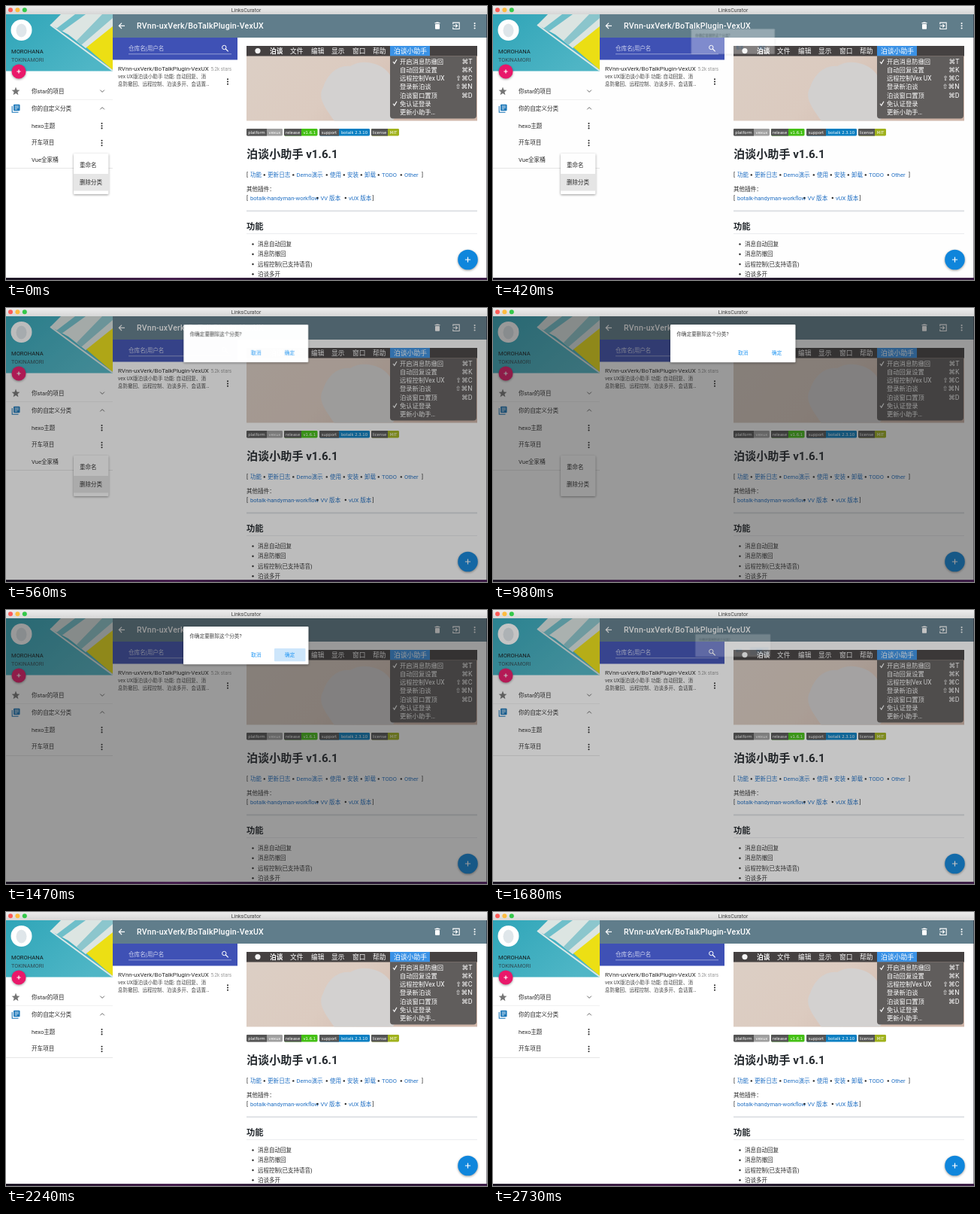
Write an HTML page that moves like this. It is 640 px wide and 364 px high and loops after 2800 ms.

```html
<!DOCTYPE html>
<html lang="zh-CN">
<head>
<meta charset="utf-8">
<title>LinksCurator</title>
<style>
html, body { margin: 0; width: 100%; height: 100%; overflow: hidden; background: #1c1724; }
svg { display: block; width: 640px; height: 364px; font-family: Roboto, "Noto Sans CJK SC", "Noto Sans CJK", sans-serif; }
text { white-space: pre; }
.badge { font-family: "DejaVu Sans", sans-serif; }
.keys { font-family: Roboto, "DejaVu Sans", sans-serif; }
.lift { filter: drop-shadow(0 1px 1.5px rgba(0,0,0,.4)); }
#dialog { transform-origin: 319px 47px; }
</style>
</head>
<body>
<svg id="stage" viewBox="0 0 640 364"></svg>
<script>
const LOOP = 2800;
const INK = '#2b2b2b', LINK = '#1f6fc4', BLUE = '#2196f3';
const REPO = 'RVnn-uxVerk/BoTalkPlugin-VexUX';

const rect = (x, y, w, h, fill, extra = '') =>
  `<rect x="${x}" y="${y}" width="${w}" height="${h}" fill="${fill}" ${extra}/>`;
const dot = (x, y, r, fill, extra = '') =>
  `<circle cx="${x}" cy="${y}" r="${r}" fill="${fill}" ${extra}/>`;
const poly = (points, fill) => `<polygon points="${points}" fill="${fill}"/>`;
const text = (x, y, size, str, fill = INK, extra = '') =>
  `<text x="${x}" y="${y}" font-size="${size}" fill="${fill}" ${extra}>${str}</text>`;
const line = (d, color, w = 1.1) =>
  `<path d="${d}" fill="none" stroke="${color}" stroke-width="${w}"/>`;
const group = (id, body) => `<g id="${id}">${body}</g>`;
const more = (x, y, color = INK) =>
  [-3.2, 0, 3.2].map(d => dot(x, y + d, 1.05, color)).join('');
const plus = (x, y, r) => line(`M${x - r} ${y}h${2 * r}M${x} ${y - r}v${2 * r}`, '#fff', 1.2);
const MEDIUM = 'font-weight="500"', BOLD = 'font-weight="700"';
const END = 'text-anchor="end"', MID = 'text-anchor="middle"';

const defs = `<defs>
  <linearGradient id="bar" x2="0" y2="1"><stop stop-color="#ededed"/><stop offset="1" stop-color="#d6d6d6"/></linearGradient>
  <linearGradient id="teal" x2="1" y2=".6"><stop stop-color="#2fa5b8"/><stop offset="1" stop-color="#4fb6c6"/></linearGradient>
  <linearGradient id="paper" x2="1" y2=".3"><stop stop-color="#dccfc5"/><stop offset=".5" stop-color="#dccbc0"/><stop offset="1" stop-color="#cfb5a8"/></linearGradient>
  <linearGradient id="desk"><stop stop-color="#1c1724"/><stop offset=".35" stop-color="#47204f"/><stop offset=".6" stop-color="#221a2c"/><stop offset="1" stop-color="#3c1d46"/></linearGradient>
  <clipPath id="win"><rect y="11" width="639.5" height="350"/></clipPath>
  <clipPath id="photo"><rect x="320" y="53" width="307" height="99.5"/></clipPath>
</defs>`;

function titleBar() {
  const lights = ['#fc5b57', '#fdbc40', '#34c84a'].map((c, i) => dot(6 + i * 9.4, 5.2, 3, c));
  return rect(0, 0, 640, 11, 'url(#bar)') + lights.join('') +
    text(319.5, 8, 7, 'LinksCurator', '#444', MID);
}

function sidebar() {
  return rect(0, 11, 142, 350, '#fff') +
    rect(0, 11, 142, 75.5, 'url(#teal)') +
    poly('73,11 142,11 142,30 106,56 83,38 59,25', '#dce5e2') +
    poly('92,11 106,11 74,34 67,30', '#6fbfca') +
    poly('128,11 142,11 142,16 100,52 94,46', '#8cc6cd') +
    poly('142,27 142,85 107,55', '#ecdf14') +
    line('M59 25L142 86', '#dfe9e8', 2) +
    dot(20.5, 32, 14, '#fff') +
    '<ellipse cx="20.5" cy="32.5" rx="7" ry="9" fill="#dfe6ea"/>' +
    text(7, 63.4, 7.6, 'MOROHANA', '#14191b') +
    text(7, 74.2, 7.2, 'TOKINAMORI', '#2f4a52') +
    dot(17, 87, 9.5, '#e9186a', 'class="lift"') + plus(17, 87, 2.6) +
    poly('13,107.6 14.5,111.5 18.4,111.7 15.4,114.3 16.4,118.2 13,116 9.6,118.2 10.6,114.3 7.6,111.7 11.5,111.5', '#757575') +
    text(34, 116, 7.6, '你star的项目') +
    line('M125.3 111.6l2.8 2.8l2.8-2.8', '#666', 1) +
    rect(0, 124, 142, .6, '#e8e8e8') +
    line('M8.2 133v8.2h8.3', '#1976b8', 1.1) +
    rect(10, 130.8, 8.5, 8.5, '#1976b8', 'rx="1"') +
    line('M11.6 133h5.3M11.6 135h5.3M11.6 137h3.3', '#fff', .8) +
    text(34, 138.8, 7.6, '你的自定义分类') +
    line('M125.3 137.4l2.8-2.8l2.8 2.8', '#666', 1) +
    text(34, 161.5, 7.6, 'hexo主题') + more(127.5, 159.2) +
    text(34, 184.2, 7.6, '开车项目') + more(127.5, 182) +
    group('rowEnd', rect(0, 193, 142, .7, '#dcdcdc')) +
    group('row', text(34, 207, 7.6, 'Vue全家桶') + more(127.5, 204.5) + rect(0, 215.3, 142, .7, '#dcdcdc'));
}

function repoList() {
  return rect(142, 42, 166, 319, '#fff') +
    rect(142, 42, 166, 29.5, '#3f51b5') +
    text(163, 58.5, 7.6, '仓库名|用户名', '#cdd2ee') +
    rect(163, 63.5, 137, .7, '#b9c0e4') +
    `<circle cx="290.3" cy="55" r="2.7" fill="none" stroke="#fff" stroke-width="1"/>` +
    line('M292.3 57l3.4 3.4', '#fff', 1.2) +
    text(149, 86, 8, REPO) +
    text(300, 86, 6.3, '5.2k stars', '#999', END) +
    text(149, 96, 6.6, 'vex UX版泊谈小助手 功能: 自动回复、消', '#444') +
    text(149, 106, 6.5, '息防撤回、远程控制、泊谈多开、会话置…', '#444') +
    more(295, 100.5);
}

function toolbar() {
  return rect(142, 11, 498, 31, '#607d8b') +
    line('M158 26.3h-7.3M154 22.6l-3.7 3.7l3.7 3.7', '#fff', 1.2) +
    text(174, 29.8, 10.6, REPO, '#fff', MEDIUM + ' letter-spacing=".02em"') +
    rect(570.5, 22, 7, 1.2, '#fff') + rect(572.3, 21.4, 3.4, 1, '#fff') +
    rect(571, 24, 6, 6.8, '#fff', 'rx=".8"') +
    line('M594.8 24.3v-2.2h8.4v8.4h-8.4v-2.2M594.5 26.3h5.6M598.3 24.1l2.2 2.2l-2.2 2.2', '#fff', 1.1) +
    more(623.6, 26.3, '#fff');
}

function picture() {
  const names = [['泊谈', 351, BOLD], ['文件', 378], ['编辑', 406], ['显示', 433], ['窗口', 461], ['帮助', 488]];
  const items = [['开启消息防撤回', '⌘T', 1], ['自动回复设置', '⌘K'], ['远程控制Vex UX', '⇧⌘C'],
    ['登录新泊谈', '⇧⌘N'], ['泊谈窗口置顶', '⌘D'], ['免认证登录', '', 1], ['更新小助手…', '']];
  const rows = items.map(([name, keys, on], i) => {
    const y = 77 + i * 11.15;
    return text(524, y, 8.3, name, '#fff') +
      text(620.5, y, 8.8, keys, '#fff', END + ' class="keys"') +
      (on ? line(`M515 ${y - 3}l1.8 2.4l3.2-5.4`, '#fff', 1.1) : '');
  });
  return `<g clip-path="url(#photo)">` + rect(320, 53, 307, 100, 'url(#paper)') +
    '<path d="M437 153C424 134 414 122 422 108C428 90 442 78 458 80C476 68 506 78 512 94C530 108 526 140 514 153Z" fill="#d3d1d0"/>' +
    rect(320, 53, 307, 13.5, '#454141') + '</g>' +
    dot(335, 59.6, 3.6, '#f4f4f4') +
    names.map(([s, x, extra]) => text(x, 62.8, 8.7, s, '#fff', extra)).join('') +
    rect(511, 53, 53, 13.5, '#3a92e6') + text(516, 62.8, 8.8, '泊谈小助手', '#fff') +
    '<path d="M511 66.5h115v79q0 4-4 4h-107q-4 0-4-4z" fill="#605d5c"/>' + rows.join('');
}

function badge(x, mid, end, key, value, color) {
  const label = (a, b, s) => text((a + b) / 2, 169.8, 5.3, s, '#fff', MID + ' class="badge"');
  return rect(x, 163, end - x, 9.5, color, 'rx="1.4"') +
    `<path d="M${mid} 163H${x + 1.4}q-1.4 0-1.4 1.4v6.7q0 1.4 1.4 1.4H${mid}z" fill="#555"/>` +
    label(x, mid, key) + label(mid, end, value);
}

// Links separated by bullets; each part is [text, x].
function links(y, parts, close) {
  return text(320, y, 7.6, '[') + text(close, y, 7.6, ']') +
    parts.map(([s, x], i) => (i ? dot(x - 4.2, y - 2.6, 1.2, INK) : '') + text(x, y, 7.6, s, LINK)).join('');
}

function readme() {
  const list = ['消息自动回复', '消息防撤回', '远程控制(已支持语音)', '泊谈多开'];
  return rect(308, 42, 332, 319, '#fff') + picture() +
    badge(320, 347, 368, 'platform', 'vexux', '#9f9f9f') +
    badge(370, 393, 414.5, 'release', 'v1.6.1', '#44c014') +
    badge(417, 443, 484, 'support', 'botalk 2.3.10', '#0a7fc2') +
    badge(486, 508, 523, 'license', 'MIT', '#a0b21c') +
    text(320, 202, 15.1, '泊谈小助手 v1.6.1', '#24292e', BOLD) +
    links(227, [['功能', 325], ['更新日志', 348], ['Demo演示', 386.5], ['使用', 431], ['安装', 454],
      ['卸载', 477], ['TODO', 500], ['Other', 530]], 553) +
    text(320, 246, 7.6, '其他插件：') +
    links(257.6, [['botalk-handyman-workflow', 325], ['VV 版本', 418.5], ['vUX 版本', 456]], 487.5) +
    rect(320, 271.3, 307, 2, '#dfe2e5') +
    text(320, 297, 11.3, '功能', '#24292e', BOLD) +
    rect(320, 302, 307, .7, '#e2e4e8') +
    list.map((s, i) => dot(328.5, 316.4 + i * 13.3, 1.2, INK) + text(335, 319 + i * 13.3, 7.5, s)).join('') +
    dot(614.5, 337, 13.3, '#0f86dc', 'class="lift"') + plus(614.5, 337, 3.6);
}

const menu = () => group('menu',
  rect(90, 196, 46.5, 54, '#fff', 'rx="1" class="lift"') +
  group('menuHover', rect(90, 223, 46.5, 22.5, '#e6e6e6')) +
  text(98, 214, 7.5, '重命名') + text(98, 236.6, 7.5, '删除分类'));

const dialog = () => group('dialog',
  rect(236, 22, 166.5, 50.3, '#fff', 'rx="1" class="lift"') +
  text(244.5, 37, 6.6, '你确定要删除这个分类?', '#444') +
  group('okHover', rect(357, 51, 41.5, 17.3, '#cde6fb', 'rx="1"')) +
  text(326, 62, 6.7, '取消', BLUE, MEDIUM) + text(371, 62, 6.7, '确定', BLUE, MEDIUM));

document.getElementById('stage').innerHTML = defs +
  rect(0, 361, 640, 3, 'url(#desk)') + titleBar() +
  `<g clip-path="url(#win)">` + readme() + repoList() + toolbar() + sidebar() + menu() +
  group('shade', rect(0, 11, 640, 350, '#212121')) + dialog() + '</g>';

// Each step: [ms, opacity, easing to the next step, scale].
const EASE = 'cubic-bezier(.25,.8,.5,1)', HOLD = 'step-end';
const steps = {
  shade: [[0, 0], [420, 0, EASE], [920, .46], [1600, .46, EASE], [2100, 0], [LOOP, 0]],
  dialog: [[0, 0, HOLD, .5], [398, 0, EASE, .5], [590, 1, HOLD, 1], [1600, 1, EASE, 1], [1800, 0, HOLD, .5], [LOOP, 0, HOLD, .5]],
  menuHover: [[0, 1, HOLD], [700, 0, HOLD], [LOOP, 0]],
  menu: [[0, 1, HOLD], [1400, 0, HOLD], [LOOP, 0]],
  row: [[0, 1, HOLD], [1400, 0, HOLD], [LOOP, 0]],
  rowEnd: [[0, 0, HOLD], [1400, 1, HOLD], [LOOP, 1]],
  okHover: [[0, 0, HOLD], [1190, .6, HOLD], [1330, 1, HOLD], [LOOP, 1]]
};
for (const [id, rows] of Object.entries(steps)) {
  const frames = rows.map(([ms, opacity, easing = 'linear', scale = 1]) =>
    ({ offset: ms / LOOP, opacity, easing, transform: `scale(${scale})` }));
  const anim = document.getElementById(id).animate(frames, { duration: LOOP, iterations: Infinity });
  anim.startTime = document.timeline.currentTime;
}
</script>
</body>
</html>
```
